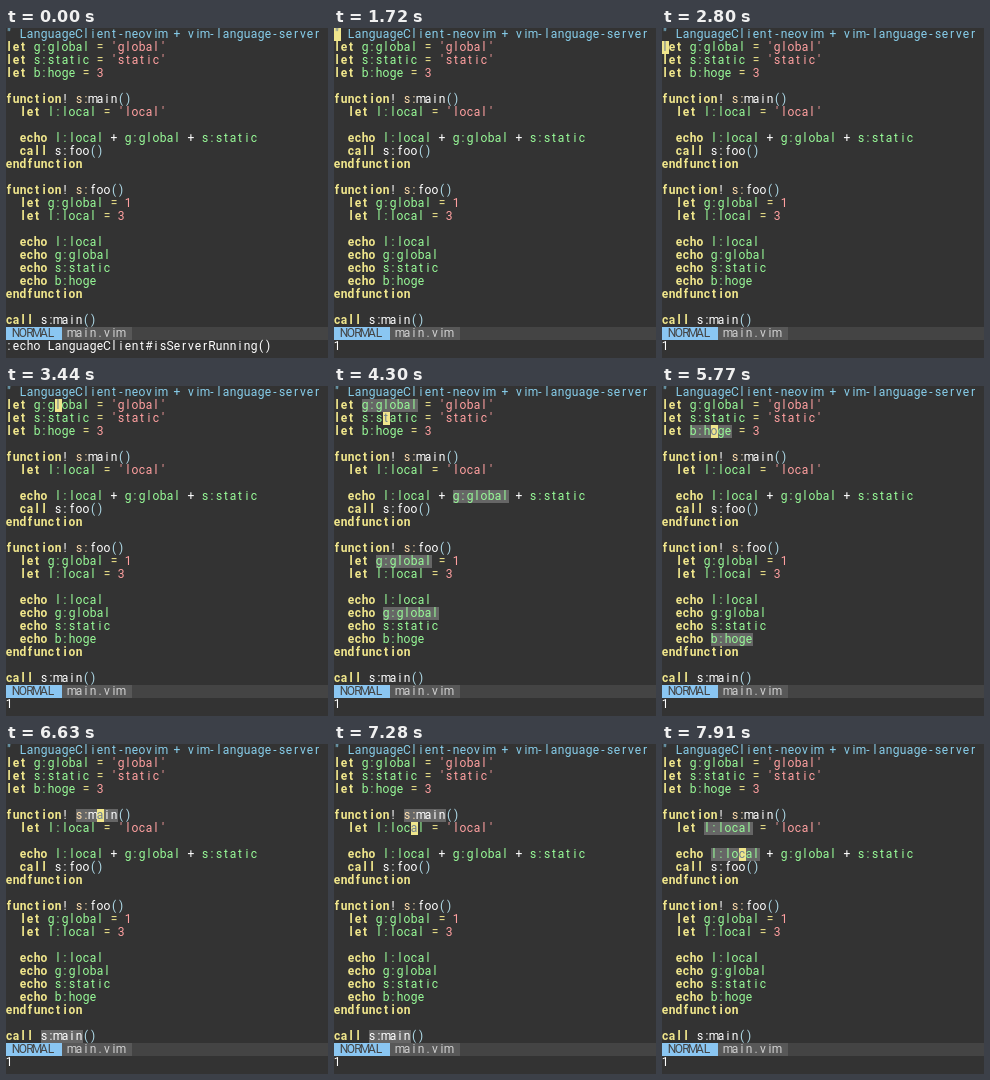
Animation, 322 px wide and 330 px high, one loop 8 s. Source, as an HTML page:

```html
<!DOCTYPE html>
<html lang="en">
<head>
<meta charset="utf-8">
<title>Document highlight in the editor</title>
<style>
  html, body { margin: 0; width: 100%; height: 100%; overflow: hidden; background: #333; }
  svg { display: block; width: 322px; height: 330px; }
  text {
    font: 12px Roboto, "Liberation Sans", sans-serif;
    font-variant-ligatures: none;
    text-anchor: middle;
    white-space: pre;
    fill: #fff;
  }
  .comment { fill: #87ceeb; }
  .keyword { fill: #f0e68c; font-weight: bold; }
  .operator { fill: #f0e68c; }
  .scope { fill: #ffdead; }
  .variable { fill: #98fb98; }
  .constant { fill: #ffa0a0; }
  .paren { fill: #add8e6; }
  .mode { fill: #444; }
  .file { fill: #d0d0d0; }
  .under { fill: #708090; }
</style>
</head>
<body>
<svg viewBox="0 0 322 330">
  <rect width="322" height="330" fill="#333"/>
  <g id="marks"></g>
  <g id="code"></g>
  <g id="status"></g>
  <g id="command"></g>
  <g id="cursor"></g>
</svg>
<script>
const CELL_W = 7, CELL_H = 13, LOOP = 8000;
const STATUS_ROW = 23, COMMAND_ROW = 24;
const COMMAND = ':echo LanguageClient#isServerRunning()';

const lines = `" LanguageClient-neovim + vim-language-server
let g:global = 'global'
let s:static = 'static'
let b:hoge = 3

function! s:main()
  let l:local = 'local'

  echo l:local + g:global + s:static
  call s:foo()
endfunction

function! s:foo()
  let g:global = 1
  let l:local = 3

  echo l:local
  echo g:global
  echo s:static
  echo b:hoge
endfunction

call s:main()`.split('\n');

// The name of the matching group is the style of the token.
const tokens = new RegExp([
  '(?<comment>^".*)',
  '(?<keyword>\\b(?:let|echo|call|function|endfunction)\\b)',
  '(?<operator>=)',
  '(?<scope>(?<=! )s:)',
  '(?<variable>\\w:\\w+\\b(?!\\())',
  "(?<constant>'\\w+'|\\b\\d)",
  '(?<paren>[()])',
  '[^\\s()]+'
].join('|'), 'g');

// Each step: [start ms, cursor row, cursor column, highlighted word]; no row means the cursor is blinked off.
const steps = [
  [0], [430, 24, 38], [640], [1070, 24, 38], [1290],
  [1720, 0, 0], [2380], [2590, 1, 0], [2810, 1, 1], [3020, 1, 3], [3230, 1, 5], [3440, 1, 7],
  [3650, 1, 7, 'g:global'], [4090, null, null, 'g:global'], [4300, 2, 7, 'g:global'],
  [4520, 2, 7, 's:static'], [4950, null, null, 's:static'], [5160], [5360, 3, 7],
  [5570, 3, 7, 'b:hoge'], [5780, 4, 0, 'b:hoge'], [5980, 5, 9], [6200, 5, 13],
  [6630, 5, 13, 's:main'], [6850, null, null, 's:main'], [7060, 5, 11, 's:main'], [7280, 6, 11, 's:main'],
  [7490, 6, 11, 'l:local'], [7700, 7, 0, 'l:local'], [7910, 8, 11, 'l:local']
];

const layer = id => document.getElementById(id);

function add(parent, tag, attrs, content = '') {
  const node = document.createElementNS('http://www.w3.org/2000/svg', tag);
  for (const name in attrs) node.setAttribute(name, attrs[name]);
  node.textContent = content;
  parent.append(node);
}

// Every character sits in its own terminal cell.
function write(parent, row, col, content, style = '') {
  const x = [...content].map((_, i) => (col + i) * CELL_W + 3).join(' ');
  add(parent, 'text', { x, y: row * CELL_H + 10, class: style }, content);
}

function block(parent, row, col, count, fill) {
  add(parent, 'rect', { x: col * CELL_W, y: row * CELL_H, width: count * CELL_W, height: CELL_H, fill });
}

function drawCode() {
  lines.forEach((line, row) => {
    for (const { 0: token, index, groups } of line.matchAll(tokens)) {
      const style = Object.keys(groups).find(name => groups[name]);
      write(layer('code'), row, index, token, style);
    }
  });
  const status = layer('status');
  block(status, STATUS_ROW, 0, 46, '#444');
  block(status, STATUS_ROW, 0, 8, '#8ac6f2');
  block(status, STATUS_ROW, 8, 10, '#585858');
  write(status, STATUS_ROW, 1, 'NORMAL', 'mode');
  write(status, STATUS_ROW, 9, 'main.vim', 'file');
}

function drawMarks(word) {
  lines.forEach((line, row) => {
    const col = line.indexOf(word);
    const inScope = word[0] !== 'l' || row < 10;
    if (col >= 0 && inScope) block(layer('marks'), row, col, word.length, '#666');
  });
}

let shown;

function render(time) {
  const step = steps.findLast(([start]) => start <= time);
  if (step === shown) return;
  shown = step;
  const [start, row, col, word] = step;
  for (const id of ['marks', 'command', 'cursor']) layer(id).replaceChildren();

  write(layer('command'), COMMAND_ROW, 0, start < 1720 ? COMMAND : '1');
  if (word) drawMarks(word);
  if (row == null) return;
  block(layer('cursor'), row, col, 1, '#f0e68c');
  const char = (lines[row] || '')[col];
  if (char) write(layer('cursor'), row, col, char, 'under');
}

drawCode();
const begin = performance.now();

function tick() {
  render((performance.now() - begin) % LOOP);
  requestAnimationFrame(tick);
}
tick();
</script>
</body>
</html>
```
